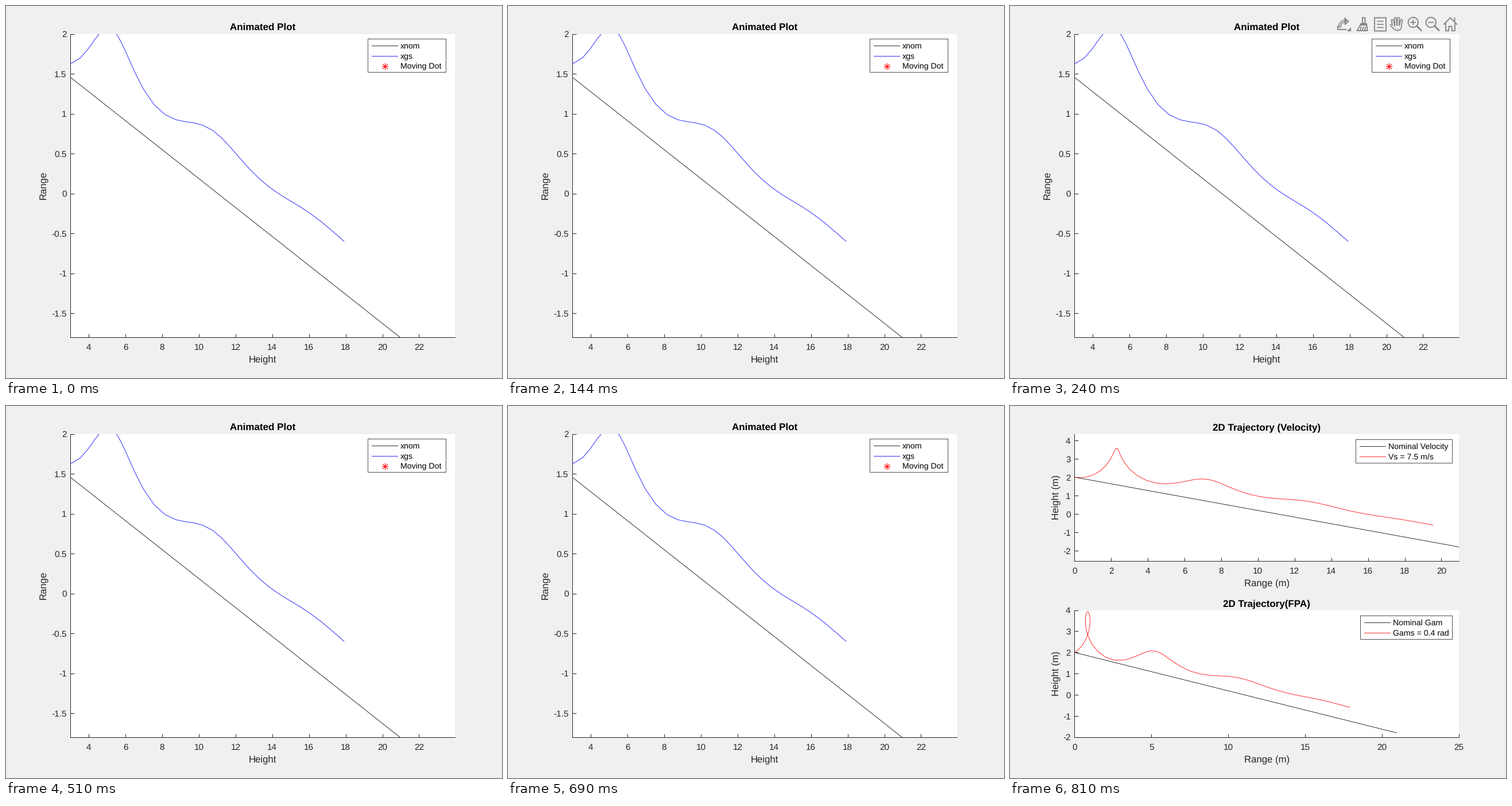
Recreate the animation shown at these times as a matplotlib script. Size 864 px wide and 648 px high, loop 840 ms.

```python
import numpy as np
import matplotlib.pyplot as plt
from matplotlib.animation import FuncAnimation
from matplotlib.patches import Polygon, Rectangle

W, H, DPI = 864, 648, 100
PT = 72 / DPI                      # points per pixel
STEP_MS, FRAMES = 30, 28
TOOLBAR_ON, TOOLBAR_OFF, SUBPLOTS_ON = 8, 17, 27
BACK, INK, ICON = "#f0f0f0", "#262626", "#858585"
LEFT, WIDE, FULL, HALF = 0.13, 0.775, 0.815, 0.3412
TICK, LABEL, TITLE, LEGEND = 15.4, 16.7, 17, 14.1
LINE = 0.8

plt.rcParams.update({"font.family": "Liberation Sans", "path.simplify": False,
                     "text.hinting": "no_hinting"})

# Paper plane aerodynamics
AREA, ASPECT, MASS, GRAV, RHO, T_END = 0.017, 0.86, 0.003, 9.8, 1.225, 6.0
CD0 = 0.02
EPS = 1 / (np.pi * 0.9 * ASPECT)
CL = np.sqrt(CD0 / EPS)
CD = CD0 + EPS * CL ** 2
GAM = -np.arctan(CD / CL)
V_TRIM = np.sqrt(2 * MASS * GRAV
                 / (RHO * AREA * (CL * np.cos(GAM) - CD * np.sin(GAM))))


def glide(state):
    v, gam = state[:2]
    force = 0.5 * RHO * v * v * AREA / MASS
    return np.array([-CD * force - GRAV * np.sin(gam),
                     (CL * force - GRAV * np.cos(gam)) / v,
                     v * np.sin(gam), v * np.cos(gam)])


def trajectory(v, gam, rtol=1e-3, floor=1e-3):
    """Adaptive Bogacki-Shampine integration; returns range and height."""
    t, y = 0.0, np.array([v, gam, 2.0, 0.0])
    k1 = glide(y)
    rate = np.max(np.abs(k1) / np.maximum(np.abs(y), floor)) / (0.8 * rtol ** (1 / 3))
    step = 1 / rate
    path = [y]
    while t < T_END:
        step = min(0.1 * T_END, step)
        last = 1.1 * step >= T_END - t
        if last:
            step = T_END - t
        failed = False
        while True:
            k2 = glide(y + step * k1 / 2)
            k3 = glide(y + step * k2 * 0.75)
            new = y + step * (2 * k1 + 3 * k2 + 4 * k3) / 9
            k4 = glide(new)
            slope = -5 * k1 / 72 + k2 / 12 + k3 / 9 - k4 / 8
            scale = np.maximum(np.maximum(np.abs(y), np.abs(new)), floor)
            err = step * np.max(np.abs(slope) / scale)
            if err <= rtol:
                break
            step *= 0.5 if failed else max(0.5, 0.8 * (rtol / err) ** (1 / 3))
            failed, last = True, False
        t = T_END if last else t + step
        y, k1 = new, k4
        path.append(y)
        if not failed:
            step /= max(0.2, 1.25 * (err / rtol) ** (1 / 3))
    path = np.array(path)
    return path[:, 3], path[:, 2]


fig = plt.figure(figsize=(W / DPI, H / DPI), dpi=DPI, facecolor=BACK)
stage = fig.add_axes([0, 0, 1, 1], zorder=5)
stage.set(xlim=(0, W), ylim=(H, 0))
stage.axis("off")


def text(group, x, y, words, size, color=INK, ha="center", **kw):
    group.append(stage.text(x, y, words, size=size * PT, color=color, ha=ha,
                            va="baseline", **kw))


def stroke(group, xs, ys, width=LINE, color=ICON, cap="butt"):
    group += stage.plot(xs, ys, color=color, lw=width * PT, snap=False,
                        solid_capstyle=cap, solid_joinstyle="round")


def legend(group, right, top, width, entries):
    left = right - width
    group.append(stage.add_patch(Rectangle(
        (left, top), width, 17 * len(entries) + 7, fc="white", ec=INK,
        lw=LINE * PT, snap=False)))
    for i, (name, color, curve) in enumerate(entries):
        y = top + 12 + 17.5 * i
        if curve:
            row = np.floor(y) + 0.5
            stroke(group, [left + 6.5, left + 52.5], [row, row], LINE, color)
        else:
            group += stage.plot(left + 29.5, y, marker=(8, 2, 0), ms=11.5 * PT,
                                mec=color, mew=LINE * PT)
        text(group, left + 56.7, y + 4.8, name, LEGEND, "black", ha="left")


def panel(group, bottom, height, xlim, ylim, xticks, yticks, title, xlabel,
          ylabel, ylabel_x, corner, legend_width, entries):
    ax = fig.add_axes([LEFT, bottom, WIDE, height], facecolor="white")
    group.append(ax)
    ax.spines[["top", "right"]].set_visible(False)
    ax.spines[["left", "bottom"]].set(linewidth=PT, edgecolor=INK)
    ax.set(xlim=xlim, ylim=ylim, xticks=xticks, yticks=yticks)
    ax.tick_params(direction="in", length=6.5 * PT, width=PT, color=INK,
                   labelbottom=False, labelleft=False)
    for _, color, curve in entries:
        if curve:
            ax.plot(*curve, color=color, lw=LINE * PT)

    x0, span = LEFT * W, WIDE * W
    base, tall = (1 - bottom) * H, height * H
    for v in xticks:
        x = x0 + (v - xlim[0]) / (xlim[1] - xlim[0]) * span
        text(group, x, base + 22, f"{v:g}", TICK)
    for v in yticks:
        y = base - (v - ylim[0]) / (ylim[1] - ylim[0]) * tall
        text(group, 105.5, y + 5.7, f"{v:g}", TICK, ha="right")
    middle = x0 + span / 2
    text(group, middle, base - tall - 6.6, title, TITLE, "black", weight="bold")
    text(group, middle, base + 43.6, xlabel, LABEL)
    text(group, ylabel_x, base - tall / 2, ylabel, LABEL, rotation=90,
         rotation_mode="anchor")
    legend(group, *corner, legend_width, entries)


class Icon:
    """Pen whose coordinates are relative to a toolbar button's centre."""

    def __init__(self, group, slot):
        self.group, self.x, self.y = group, 581 + 31 * slot, 31.5

    def line(self, *points, width=1.9, color=ICON):
        xs, ys = np.transpose(points)
        stroke(self.group, xs + self.x, ys + self.y, width, color, "round")

    def fill(self, *points, color=ICON):
        self.group.append(stage.add_patch(
            Polygon(np.add(points, (self.x, self.y)), fc=color, lw=0, zorder=2)))

    def box(self, x, y, w, h):
        self.line((x, y), (x + w, y), (x + w, y + h), (x, y + h), (x, y))

    def arc(self, x, y, rx, ry, start=0, stop=360, **kw):
        a = np.radians(np.linspace(start, stop, 40))
        self.line(*zip(x + rx * np.cos(a), y + ry * np.sin(a)), **kw)


def export_icon(pen):
    pen.line((-10, 4), (-10, 9.5), (5, 9.5))
    for width, color in ((5, ICON), (1.6, BACK)):
        pen.arc(3, 4, 9.5, 9, 180, 270, width=width, color=color)
    pen.line((2.5, -10), (8.5, -4.5), (2.5, 0.5), (2.5, -10))
    pen.fill((13, 5), (13, 12), (6, 12))


def brush_icon(pen):
    pen.box(2, -11, 4.5, 9.5)
    pen.fill((-2, -2), (10, -2), (10, 2.5), (-2, 2.5))
    pen.line((-2, 2), (-7.5, 11.5), (10.5, 11.5), (9.5, 2))
    for x in (-1, 3, 7):
        pen.line((x + 0.5, 5), (x - 1, 10.5))


def datatip_icon(pen):
    pen.box(-8, -11, 20, 23)
    for y in (-5, 0.5, 6):
        pen.line((-3, y), (7, y), width=1.7)


def hand_icon(pen):
    fingers = [((1.9 * k, 3), (2.7 * k, 0.45 * k * k - 10.5)) for k in (-3, -1, 1, 3)]
    thumb = [(-3.5, 8), (-9.5, 2)]
    for width, color in ((5, ICON), (1.7, BACK)):
        for part in fingers + [thumb]:
            pen.line(*part, width=width, color=color)
        pen.arc(1, 4, 5.5, 5.5, 0, 180, width=width, color=color)
    pen.fill((-4, 3), (6, 3), (5, 8), (-2, 8), color=BACK)


def zoom_icon(pen, angles):
    pen.arc(-2.7, -3, 8.7, 8.7)
    for a in angles:
        dx, dy = 4.3 * np.cos(a), 4.3 * np.sin(a)
        pen.line((-2.7 - dx, -3 - dy), (-2.7 + dx, -3 + dy))
    pen.line((3.8, 3.5), (11.3, 11), width=2.8)


def home_icon(pen):
    pen.line((-11.5, 0.5), (0, -11), (11.5, 0.5))
    pen.line((7.5, -4.5), (7.5, -11))
    for side in (-1, 1):
        pen.line((8 * side, -1), (8 * side, 11.7), (2.7 * side, 11.7),
                 (2.7 * side, 4), (0, 4))


nominal = trajectory(V_TRIM, GAM)
fast = trajectory(7.5, GAM)
steep = trajectory(7.5, 0.4)
reach = V_TRIM * np.cos(GAM) * T_END

single, toolbar, subplots = [], [], []

panel(single, 0.11, FULL, (3, 3 + reach), (-1.8, 2), range(4, 23, 2),
      np.arange(-1.5, 2.1, 0.5), "Animated Plot", "Height", "Range", 70.4,
      (766.5, 57.5), 136,
      [("xnom", "black", nominal), ("xgs", "blue", steep),
       ("Moving Dot", "red", None)])

# Equal scale on both axes, centred on the flight's height span
half = reach * HALF * H / (WIDE * W) / 2
panel(subplots, 0.5838, HALF, (0, reach), (0.9 - half, 0.9 + half),
      range(0, 21, 2), range(-2, 5), "2D Trajectory (Velocity)",
      "Range (m)", "Height (m)", 84, (770.5, 58.5), 168,
      [("Nominal Velocity", "black", nominal), ("Vs = 7.5 m/s", "red", fast)])
panel(subplots, 0.11, HALF, (0, 25), (-2, 4), range(0, 26, 5),
      range(-2, 5), "2D Trajectory(FPA)", "Range (m)", "Height (m)", 84,
      (770.5, 365.5), 160,
      [("Nominal Gam", "black", nominal), ("Gams = 0.4 rad", "red", steep)])

icons = [export_icon, brush_icon, datatip_icon, hand_icon,
         lambda pen: zoom_icon(pen, (0, np.pi / 2)),
         lambda pen: zoom_icon(pen, (0,)), home_icon]
for slot, icon in enumerate(icons):
    icon(Icon(toolbar, slot))


def show(group, visible):
    for artist in group:
        artist.set_visible(visible)


def draw(frame):
    show(single, frame < SUBPLOTS_ON)
    show(toolbar, TOOLBAR_ON <= frame < TOOLBAR_OFF)
    show(subplots, frame >= SUBPLOTS_ON)
    return single + toolbar + subplots


animation = FuncAnimation(fig, draw, frames=FRAMES, interval=STEP_MS,
                          repeat=True, repeat_delay=0, blit=False)
plt.show()
```
